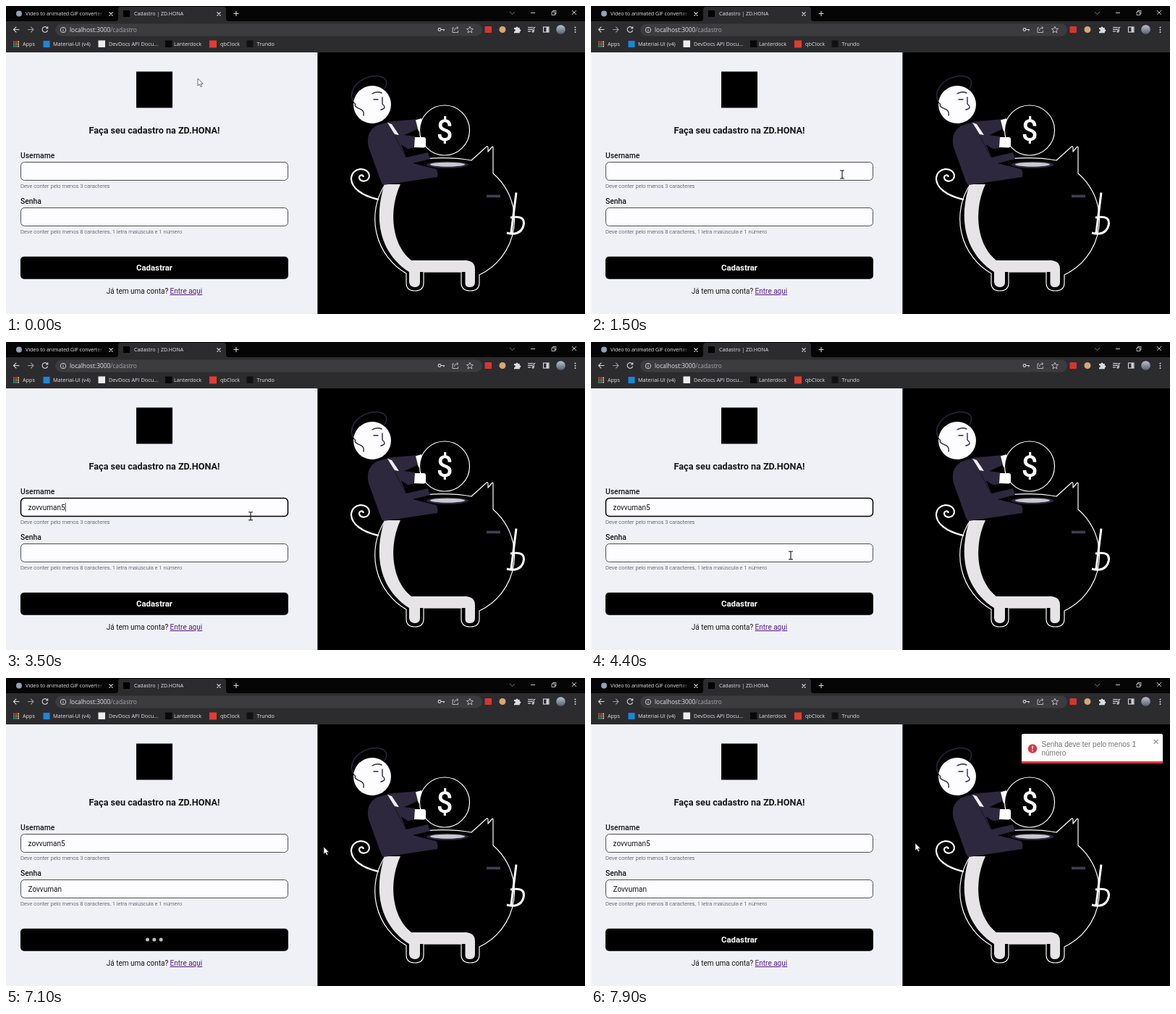
Animation of 800x425 px, one loop 8 s. Source, as an HTML page:

```html
<!DOCTYPE html>
<html lang="pt">
<head>
<meta charset="utf-8">
<title>Cadastro</title>
<style>
  html, body { margin: 0; width: 100%; height: 100%; overflow: hidden; background: #000; }
  svg { display: block; width: 800px; height: 425px; }
  .ui { font-family: "Open Sans", sans-serif; font-size: 7.3px; fill: #e4e5e8; }
  .tab { font-size: 7.05px; }
  .page { font-family: Roboto, sans-serif; font-size: 10px; fill: #16161a; }
  .label { font-size: 10.35px; font-weight: 500; }
  .hint { font-size: 7.62px; font-weight: 300; fill: #33343c; }
  .toast { font-family: "Liberation Sans", Arial, sans-serif; font-size: 10px; fill: #757575; }
  .line { fill: none; stroke: #d6d7da; stroke-width: 1.1; }
  .white { fill: none; stroke: #fff; stroke-width: 1.2; stroke-linejoin: round; }
  .thick { stroke-width: 2.2; }
  .snout { stroke-width: 3; }
  .ink { fill: none; stroke: #2d283e; stroke-width: 1.4; stroke-linecap: round; }
  .suit { fill: #2d283e; }
  .field { fill: #fdfdff; stroke: #4d4e57; stroke-width: 1; }
  .field.on { stroke: #000; stroke-width: 1.5; }
</style>
</head>
<body>
<svg viewBox="0 0 800 425">
  <defs>
    <linearGradient id="fade" gradientUnits="userSpaceOnUse" x1="122" x2="136">
      <stop stop-color="#e4e5e8"/><stop offset="1" stop-color="#e4e5e8" stop-opacity="0"/>
    </linearGradient>
    <linearGradient id="photo" x2="0" y2="1">
      <stop stop-color="#b9c4d2"/><stop offset="1" stop-color="#55606c"/>
    </linearGradient>
  </defs>

  <!-- browser -->
  <rect width="800" height="22" fill="#050506"/>
  <rect y="21" width="800" height="44" fill="#2c2c2f"/>
  <path d="M151 21Q155 21 155 17V5Q155 1 159 1H300Q304 1 304 5V17Q304 21 308 21Z" fill="#2c2c2f"/>
  <rect x="68" y="24.500" width="590" height="17" rx="8.500" fill="#3c3c3f"/>
  <circle cx="18" cy="10.500" r="4" fill="#8fa3b5"/>
  <rect x="162" y="6" width="9" height="9" fill="#000"/>
  <g class="ui tab">
    <text x="27" y="13.300" style="fill:url(#fade)">Video to animated GIF converter</text>
    <text x="177" y="13.300">Cadastro | ZD.HONA</text>
  </g>
  <g class="line">
    <path d="M142.500 8.500l5 5m0-5l-5 5M291.500 8.500l5 5m0-5l-5 5M314.500 10.500h7m-3.500-3.500v7"/>
    <path d="M696 8l3.500 3.500L703 8" stroke="#8e8e92" stroke-width=".8"/>
    <path d="M725 9.500h6M782 6l6 6m0-6l-6 6" stroke-width=".9"/>
    <path d="M754 8h4.500v4.500H754zM755.500 8V6.500h4.500V11h-1.500" stroke-width=".8"/>
    <path d="M18.500 32.500H10.500m3.800-3.800l-3.800 3.800 3.800 3.800"/>
    <path d="M30 32.500h8m-3.800-3.800l3.800 3.800-3.800 3.800" stroke="#97989c"/>
    <path d="M57 30.200A3.800 3.800 0 1 0 57.600 33.500M57.700 28.300v2.700h-2.700"/>
    <circle cx="79" cy="33" r="3.700" stroke-width=".9"/><path d="M79 32.400v2.600M79 30.500v1" stroke-width=".9"/>
    <circle cx="599" cy="32.500" r="1.900"/><path d="M601 32.500h5m-1.200 0v2"/>
    <path d="M619 30h-2v6.500h7.500V34M619.500 34c0-3 2-4 5-4m-1.800-2l2 2-2 2" stroke-width=".8"/>
    <path d="M641 28.200l1.300 3 3.200.3-2.400 2.100.7 3.200-2.800-1.700-2.800 1.700.7-3.200-2.400-2.100 3.200-.3z" stroke-width=".8"/>
    <path d="M721 29.500h7m-7 2.700h7m-7 2.700h4" stroke-width="1.200"/>
    <circle cx="728" cy="35" r="1.100"/><path d="M729.300 35v-5.500h2"/>
    <rect x="742.500" y="29" width="7.500" height="7"/><path d="M748 29v7" stroke-width="3"/>
  </g>
  <rect x="661.500" y="28" width="9.500" height="9" rx="1" fill="#d8342f"/>
  <circle cx="686" cy="32.500" r="4.500" fill="#d6a878"/>
  <path d="M702 30h2.500a1.500 1.500 0 1 1 3 0h2.300v2.300a1.500 1.500 0 1 1 0 3v2H702v-2.300a1.400 1.400 0 1 0 0-2.700z" fill="#dcdde0"/>
  <circle cx="766.500" cy="32.500" r="6.300" fill="url(#photo)"/>
  <g fill="#d6d7da"><circle cx="786.500" cy="29.500" r="1"/><circle cx="786.500" cy="32.700" r="1"/><circle cx="786.500" cy="35.900" r="1"/></g>
  <text class="ui" x="88" y="35.800" style="font-size:8.35px">localhost:3000<tspan fill="#a6a8ad">/cadastro</tspan></text>
  <g id="apps"></g>
  <rect x="51.500" y="48" width="9" height="9" fill="#1a87d9"/>
  <rect x="127.500" y="47.500" width="9.500" height="9.500" fill="#eceded"/>
  <rect x="220" y="47.500" width="9.500" height="9.500" fill="#08080a"/>
  <rect x="281" y="47.500" width="10" height="10" fill="#e33b32"/>
  <rect x="332.500" y="47.500" width="9" height="9.500" fill="#111114"/>
  <g class="ui">
    <text x="23" y="55">Apps</text>
    <text x="65" y="55">Material-UI (v4)</text>
    <text x="142" y="55">DevDocs API Docu...</text>
    <text x="232" y="55">Lanterdock</text>
    <text x="296" y="55">qbClock</text>
    <text x="346.500" y="55">Trundo</text>
  </g>

  <!-- form -->
  <rect y="64" width="800" height="361" fill="#000"/>
  <rect y="64" width="430.400" height="361" fill="#f0f1f7"/>
  <rect x="180" y="90.500" width="50" height="50" fill="#000"/>
  <g class="page">
    <text x="205" y="176" text-anchor="middle" style="font-size:12.65px;font-weight:600">Faça seu cadastro na ZD.HONA!</text>
    <text class="label" x="20" y="210">Username</text>
    <text class="label" x="20" y="273">Senha</text>
    <text class="hint" x="20" y="250.500">Deve conter pelo menos 3 caracteres</text>
    <text class="hint" x="20" y="313.500">Deve conter pelo menos 8 caracteres, 1 letra maiúscula e 1 número</text>
    <rect id="box0" class="field" x="20.500" y="215.500" width="369" height="25" rx="5"/>
    <rect id="box1" class="field" x="20.500" y="278.500" width="369" height="25" rx="5"/>
    <text id="val0" x="30.500" y="231.700"></text>
    <text id="val1" x="30.500" y="294.700"></text>
    <rect id="caret" width=".8" height="12"/>
    <rect x="20" y="345.700" width="370" height="31" rx="5" fill="#000"/>
    <text id="send" x="205" y="365.400" text-anchor="middle" fill="#fff" style="font-size:11.4px;font-weight:600">Cadastrar</text>
    <g id="dots" fill="#fff">
      <circle cx="195.500" cy="361"/><circle cx="204.800" cy="361"/><circle cx="214.100" cy="361"/>
    </g>
    <text x="205" y="397" text-anchor="middle">Já tem uma conta? <tspan fill="#551a8b" text-decoration="underline">Entre aqui</tspan></text>
  </g>

  <!-- piggy bank -->
  <path class="white" d="M524 246A87 87 0 0 0 553 369V382Q553 393 565 393T577 382V367H629V382Q629 393 641.500 393T654 382V371A84 84 0 0 0 673 231V195Q673 193 671 195L666 201V196Q666 192 663 195L643 213C620 209 590 208 556 214"/>
  <path d="M523 246H545C528 282 533 330 560 351H636Q648 352 648 363V381Q648 388 641 388T634.500 381V367H572V381Q572 388 565 388T557 381V367C515 340 508 292 523 246Z" fill="#e6e4e7"/>
  <path class="white thick" d="M515 267C492 262 477 251 477 238C478 222 500 221 502 234C502 243 489 244 488 237C488 233 493 232 494 236"/>
  <ellipse class="suit" cx="610" cy="219" rx="29" ry="4.800"/>
  <ellipse cx="610" cy="218.700" rx="24" ry="3" fill="#c9c8cc"/>
  <rect x="664" y="260.500" width="19" height="3.700" fill="#3f3d56"/>
  <path class="white snout" d="M705 257.500L698 313M697 292C713 289 717 294 715 303C712 314 702 316 692 313"/>

  <!-- rider -->
  <circle cx="506" cy="136" r="26" fill="#fdfcff"/>
  <path class="ink" d="M483 136C476 130 476 119 482 111C490 100 505 95 516 97C526 99 528 106 523 114M482 137C484 143 496 140 494 151"/>
  <path class="ink" d="M506 121Q513 117 519 120M508 129H514M520 126V135Q527 141 518 143"/>
  <path class="suit" d="M525 160L570 156L577 166L544 181Z"/>
  <path d="M566 157.500L574 155L577 167L570 173Z" fill="#fff"/>
  <path class="suit" d="M512 165Q518 162 527 161L541 177L565 180V196L555 197L546 191L553 209L583 202L586 211L562 217L594 225Q597 227 596 236L522 247Q519 246 517 239L501 195Q496 174 512 165Z"/>
  <path d="M527 161L533 163L543 178L537 177Z" fill="#f3f1f5"/>
  <path d="M537 179L553 209" fill="none" stroke="#15141f"/>
  <circle cx="606" cy="171.500" r="34.500" stroke="#fff" stroke-width="1.200"/>
  <path d="M565 181H577Q580 181 580 184V192Q580 195 577 195.500L564 195Z" fill="#fff"/>
  <text x="606" y="186.300" text-anchor="middle" fill="#fff" style="font:500 40px Roboto,sans-serif">$</text>

  <g id="toast">
    <rect x="595" y="77" width="195" height="41" rx="2.500" fill="#fff"/>
    <path d="M595 115h195v.5q0 2.500-2.500 2.500h-190q-2.500 0-2.500-2.500z" fill="#d9363e"/>
    <circle cx="610" cy="97.500" r="6.200" fill="#d9363e"/>
    <path d="M610 93.700v4.600M610 99.800v1.500" stroke="#fff" stroke-width="1.500"/>
    <text class="toast" x="622.500" y="95">Senha deve ter pelo menos 1</text>
    <text class="toast" x="622.500" y="107">número</text>
    <path d="M777.500 84.800l6 6m0-6l-6 6" stroke="#8a8a8a" stroke-width="1.200"/>
  </g>

  <g id="mouse">
    <path id="arrow" d="M0 0V10L2.300 7.900L4 11.500L5.700 10.700L4.100 7.300H7.200Z" fill="#fff" stroke="#333" stroke-width=".7"/>
    <path id="beam" d="M-3-5H-.7L0-4.300L.7-5H3M0-4.300V5.300M-3 6H-.7L0 5.300L.7 6H3" fill="none" stroke="#111" stroke-width="1.100"/>
    <path id="hand" d="M-1 1Q0-1 1 1V5L5.500 6Q7 6.500 6.500 8.500L5.500 12H0L-3 7.500Q-3 6-1 7.500Z" fill="#fff" stroke="#000" stroke-width=".7"/>
  </g>
</svg>
<script>
const LOOP = 8000, STEP = 100, BLINK = 400;
const $ = id => document.getElementById(id);
const show = (el, on) => el.setAttribute('visibility', on ? 'visible' : 'hidden');
const place = (el, x, y) => el.setAttribute('transform', `translate(${x} ${y})`);

const fields = [
  { text: 'zovvuman5', keys: [2400, 2500, 2600, 2700, 2800, 2900, 3000, 3100, 3200], from: 1800, to: 4500, y: 222 },
  { text: 'Zovvuman', keys: [4800, 5000, 5200, 5500, 5600, 5700, 5800, 6000], from: 4500, to: 6900, y: 285 }
];
const CLICK = 6900, REPLY = 7300, SLIDE = 7200;

// time, x, y
const path = [
  [0, 265, 100], [100, 266, 101], [600, 303, 166], [1100, 347, 232],
  [3300, 347, 232], [4200, 276, 294], [6400, 276, 294], [6800, 288, 358],
  [6900, 290, 358], [7100, 439, 233], [7200, 448, 228], [LOOP, 448, 228]
];
// progress, x offset
const bounce = [[0, 1875], [.6, -15.6], [.75, 6.25], [.9, -3.1], [1, 0]];

const smooth = p => p * p * (3 - 2 * p);
const easeOut = p => 1 - (1 - p) ** 3;

function along(points, t, ease) {
  const last = points[points.length - 1];
  if (t >= last[0]) return last.slice(1);
  const i = points.findIndex(k => k[0] > t);
  const a = points[i - 1], b = points[i];
  const p = ease((t - a[0]) / (b[0] - a[0]));
  return a.slice(1).map((v, n) => v + (b[n + 1] - v) * p);
}

const appColors = ['#e5473a', '#e5473a', '#f0b429', '#3fa757', '#4c8bf5', '#f0b429', '#3fa757', '#4c8bf5', '#f0b429'];
$('apps').innerHTML = appColors.map((c, i) =>
  `<rect x="${10 + i % 3 * 3}" y="${48.5 + Math.floor(i / 3) * 3}" width="2.100" height="2.100" fill="${c}"/>`).join('');

function drawFields(t) {
  show($('caret'), false);
  fields.forEach((f, i) => {
    const typed = f.keys.filter(k => k <= t);
    const focus = t >= f.from && t < f.to;
    const val = $('val' + i);
    val.textContent = f.text.slice(0, typed.length);
    $('box' + i).classList.toggle('on', focus);
    if (!focus) return;
    const last = typed.length ? typed[typed.length - 1] : f.from;
    show($('caret'), Math.floor((t - last) / BLINK) % 2 === 0);
    place($('caret'), 30.7 + val.getComputedTextLength(), f.y);
  });
}

function drawDots(t) {
  const busy = t >= CLICK && t < REPLY;
  show($('send'), !busy);
  show($('dots'), busy);
  const wave = Math.abs((t - CLICK) / 400 % 2 - 1);
  [...$('dots').children].forEach((dot, i) => {
    const v = i === 1 ? 1 - wave : wave;
    dot.setAttribute('r', 1.9 + 1.2 * v);
    dot.setAttribute('fill-opacity', .5 + .5 * v);
  });
}

function drawMouse(t) {
  const [x, y] = along(path, t, smooth);
  const inside = (top, bottom) => x > 20 && x < 390 && y > top && y < bottom;
  const beam = inside(215, 241) || inside(278, 304);
  const hand = inside(345, 377);
  place($('mouse'), x, y);
  show($('beam'), beam);
  show($('hand'), hand);
  show($('arrow'), !beam && !hand);
}

function drawToast(t) {
  const p = (t - SLIDE) / 700;
  show($('toast'), p > 0);
  if (p > 0) place($('toast'), along(bounce, p, easeOut)[0], 0);
}

function draw(t) {
  drawFields(t);
  drawDots(t);
  drawMouse(t);
  drawToast(t);
}

const start = performance.now();
function tick() {
  const t = (performance.now() - start) % LOOP;
  draw(Math.floor(t / STEP) * STEP);
  requestAnimationFrame(tick);
}
tick();
</script>
</body>
</html>
```
